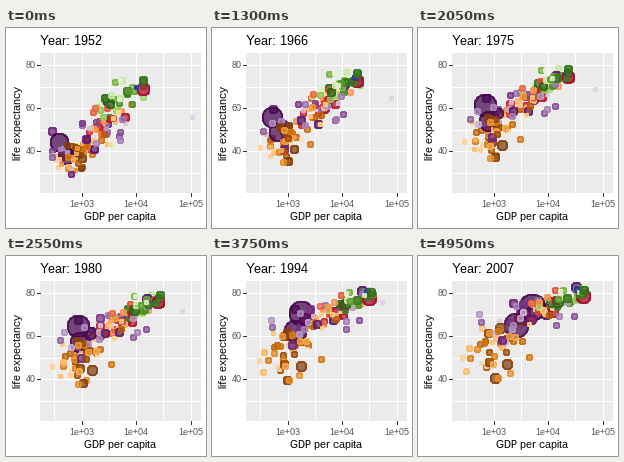
A matplotlib script for the animation above (5000 ms loop, 200 px wide and 200 px high).

```python
import matplotlib.pyplot as plt
import numpy as np
from matplotlib.animation import FuncAnimation
from matplotlib.colors import LinearSegmentedColormap
from matplotlib.patches import Rectangle

SIZE, DPI = 200, 72  # at 72 dpi one point is one pixel
FRAMES, INTERVAL = 100, 50
LEFT, RIGHT, TOP, BOTTOM = 34, 194.5, 25, 164.5
XLIM, YLIM = (2.2485, 5.189), (20.65, 85.55)
LIFE_BEND = 1.7
MAX_POP = 1319

plt.rcParams.update({"font.family": "Liberation Sans",
                     "text.hinting": "default", "text.hinting_factor": 1})
rng = np.random.default_rng(12)

# GDP, life expectancy and population (millions) at start and end,
# then the bend of the GDP curve
LEADERS = {
    "Asia": {"China": (400, 4959, 44, 73, 556, 1319, 1.8),
             "India": (547, 2452, 37.4, 64.7, 372, 1110, 1.6),
             "Indonesia": (750, 3541, 37.5, 70.7, 82, 223, 1.4),
             "Japan": (3217, 31656, 63, 82.6, 86, 127, .5),
             "Kuwait": (108382, 47307, 55.6, 77.6, .2, 2.5, 1)},
    "Africa": {"Nigeria": (1077, 2014, 36.3, 46.9, 33, 135, .5)},
    "Americas": {"Brazil": (2109, 9066, 50.9, 72.4, 57, 190, .5),
                 "United States": (13990, 42952, 68.4, 78.2, 158, 301, 1)},
}

# Count; log GDP, its spread, life and its spread at start and end;
# median population and the share of it already there at the start
SMALL = {
    "Africa": (51, (2.99, 3.2), (.25, .43), (39, 54.8), (4.8, 9), 8, .3),
    "Americas": (23, (3.5, 3.93), (.22, .27), (54, 73.4), (8, 4), 8, .4),
    "Asia": (28, (3.15, 3.75), (.38, .52), (45.5, 70.5), (8.5, 6.5), 13, .38),
    "Europe": (30, (3.7, 4.37), (.26, .25), (65, 77.6), (5, 2.6), 9, .75),
    "Oceania": (2, (4.01, 4.46), (.01, .06), (69.2, 80.7), (.2, .5), 5, .45),
}

PALETTES = {
    "Africa": ["#7F3B08", "#B35806", "#E08214", "#FDB863", "#FEE0B6"],
    "Americas": ["#A50026", "#D73027", "#F46D43", "#FDAE61", "#FEE090"],
    "Asia": ["#40004B", "#762A83", "#9970AB", "#C2A5CF", "#E7D4E8"],
    "Europe": ["#276419", "#4D9221", "#7FBC41", "#B8E186", "#E6F5D0"],
    "Oceania": ["#313695", "#4575B4"],
}


def score_pair():
    """Standard scores for start and end that mostly agree."""
    start = rng.normal()
    return np.clip([start, .75 * start + .65 * rng.normal()], -2, 2)


def small_country(gdp, gdp_sd, life, life_sd, pop, share):
    wealth = score_pair()
    health = .6 * wealth + .75 * score_pair()
    x = np.clip(gdp + wealth * gdp_sd, 2.47, (4.15, 4.68))
    y = np.clip(life + health * life_sd, (29, 40), (72.7, 82.2))
    end = min(pop * np.exp(rng.normal(0, 1.1)), 85)
    return (*x, *y, end * share, end, rng.uniform(.5, 1.1))


def continent(name):
    """Rows of drawing order, course values and colour."""
    rows = []
    for country, (g0, g1, *rest) in LEADERS.get(name, {}).items():
        order = (ord(country[0]) - ord("A")) / 26
        rows.append((order, np.log10(g0), np.log10(g1), *rest))
    count, *stats = SMALL[name]
    rows += [(rng.random(), *small_country(*stats)) for _ in range(count)]
    # the most populous country gets the darkest shade
    rows.sort(key=lambda r: -r[6])
    ramp = LinearSegmentedColormap.from_list(name, PALETTES[name])
    return [(*row, *ramp(t)) for row, t in zip(rows, np.linspace(0, 1, len(rows)))]


world = np.array(sorted(row for name in SMALL for row in continent(name)))
gdp0, gdp1, life0, life1, pop0, pop1, bend = world[:, 1:8].T
shades = world[:, 8:]
phase = rng.uniform(0, 2 * np.pi, len(world))


def x_pixel(v):
    return LEFT + (v - XLIM[0]) / (XLIM[1] - XLIM[0]) * (RIGHT - LEFT)


def y_pixel(v):
    return BOTTOM - (v - YLIM[0]) / (YLIM[1] - YLIM[0]) * (BOTTOM - TOP)


def snap(v):
    return np.floor(v) + .5


def state(u):
    """Pixel centres and marker areas at progress u."""
    sway = np.sin(9 * u + phase) - np.sin(phase)
    log_gdp = gdp0 + (gdp1 - gdp0) * u ** bend + .02 * sway
    life = life0 + (life1 - life0) * (1 - (1 - u) ** LIFE_BEND)
    pop = pop0 + (pop1 - pop0) * u
    # area scale from 2 to 12 mm, drawn with whole-pixel radii
    mm = 2 + 10 * np.sqrt(pop / MAX_POP)
    radius = np.floor(.375 * (mm * 72.27 / 25.4 + .945))
    centres = np.column_stack([snap(x_pixel(log_gdp)), snap(y_pixel(life))])
    return centres, (2 * radius) ** 2


fig = plt.figure(figsize=(SIZE / DPI, SIZE / DPI), dpi=DPI, facecolor="white")
ax = fig.add_axes([0, 0, 1, 1])
ax.set(xlim=(0, SIZE), ylim=(SIZE, 0))
ax.axis("off")
ax.add_patch(Rectangle((LEFT, TOP), RIGHT - LEFT, BOTTOM - TOP,
                       facecolor="#EBEBEB", lw=0, antialiased=False))


def line(xs, ys, color="white"):
    ax.plot(xs, ys, color=color, lw=1, antialiased=False,
            solid_capstyle="butt", zorder=1.5)


def label(x, y, text, size, color="black", **kw):
    return ax.text(x, y, text, fontsize=size, color=color, **kw)


for v in np.arange(2.5, 5.1, .5):
    x = snap(x_pixel(v))
    line([x, x], [TOP, BOTTOM])
    if v % 1 == 0:
        line([x, x], [BOTTOM, BOTTOM + 3], "#333333")
        label(x, 179, f"1e+0{v:.0f}", 9, "#4D4D4D", ha="center")
for v in range(30, 81, 10):
    y = snap(y_pixel(v))
    line([LEFT, RIGHT], [y, y])
    if v % 20 == 0:
        line([LEFT - 3, LEFT], [y, y], "#333333")
        label(30, y + 3.5, str(v), 9, "#4D4D4D", ha="right")

label((LEFT + RIGHT) / 2, 192, "GDP per capita", 11, ha="center")
label(15, (TOP + BOTTOM) / 2, "life expectancy", 11, rotation=90,
      rotation_mode="anchor", ha="center", va="baseline")
title = label(LEFT, 17, "Year: 1952", 13)

centres, areas = state(0)
dots = ax.scatter(*centres.T, s=areas, c=shades, edgecolors=shades,
                  linewidths=1, alpha=.7, antialiased=False, zorder=3)


def update(i):
    u = i / (FRAMES - 1)
    centres, areas = state(u)
    dots.set_offsets(centres)
    dots.set_sizes(areas)
    title.set_text(f"Year: {round(1952 + 55 * u)}")
    return dots, title


anim = FuncAnimation(fig, update, frames=FRAMES, interval=INTERVAL, repeat=True)
plt.show()
```
